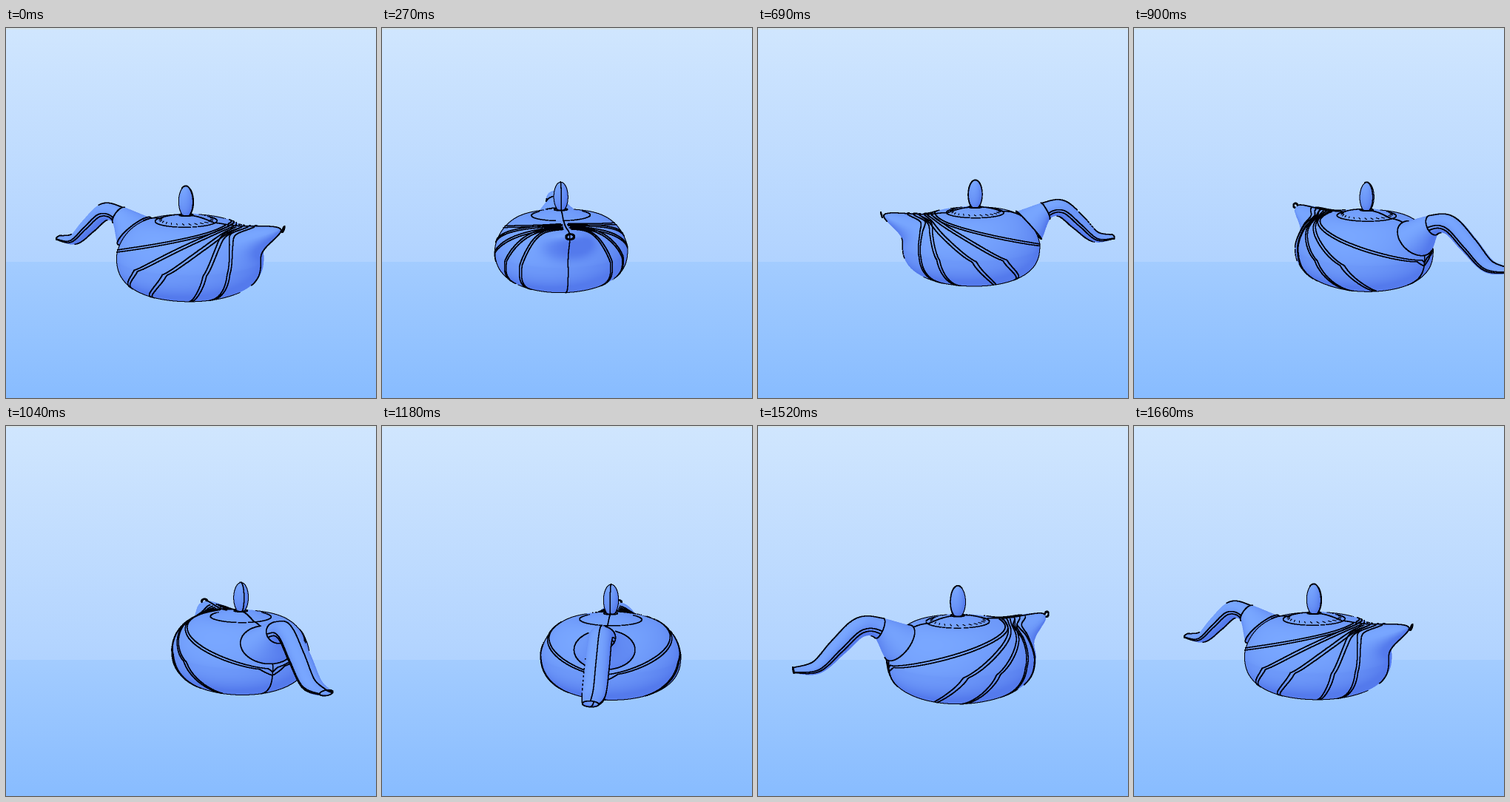
Recreate the animation shown at these times as an HTML page with a canvas. Size 500x500 px, loop 1730 ms.

```html
<!DOCTYPE html>
<html lang="en">
<head>
<meta charset="utf-8">
<title>Rotating teapot</title>
<style>
  html, body { margin: 0; width: 100%; height: 100%; overflow: hidden; }
  body {
    background:
      linear-gradient(#d6e3ea 2px, transparent 2px),
      linear-gradient(#d0e6fe 0, #b1d3ff 316px, #a3ccff 316px, #88bcff 500px);
  }
  canvas { display: block; width: 500px; height: 500px; }
</style>
</head>
<body>
<canvas id="stage" width="500" height="500"></canvas>
<script>
const LOOP = 1730, STEPS = 24, RAD = Math.PI / 180, TAU = 2 * Math.PI;
const TOP = 190, W = 1000, H = 400; // view strip, drawn at double size
const ctx = document.getElementById('stage').getContext('2d');

const { sin, cos, abs, min, max, hypot } = Math;
const pow = (x, p) => max(0, x) ** p;
const turn = (r, a, h) => [r * cos(a), r * sin(a), h];

// Body: superellipse of revolution, fuller at the front, with a spout drawn out of it.
// s runs from the lid rim (0) over the widest ring (6) to the base (12).
function bodyAt(a, s) {
  const q = s * 15 * RAD;
  let r, h;
  if (s < 6) {
    r = 40 + 52 * pow(sin(q), 0.91);
    h = -42 + 47 * pow(cos(q), 1.25);
  } else {
    r = 92 * pow(sin(q), 0.77);
    h = -42 - 50 * pow(-cos(q), 0.77);
  }
  r *= 1 + 0.12 * pow(cos(a), 2) * min(1, s / 3);
  const spout = Math.exp(-((a / 0.27) ** 2) - ((s - 3) / 1.15) ** 2);
  return turn(r + 40 * spout, a, h + 16 * spout);
}

const lidAt = (a, x) => turn(40.5 - 34.5 * x, a, 4.5 + 7.5 * sin(x * TAU / 4));
const knobAt = (a, x) => {
  const b = (30 + 150 * x) * RAD;
  return turn(10 * sin(b), a, 30 - 20.5 * cos(b));
};

// Handle sections: [u, height, half width, half thickness]
const HANDLE = [[-78, -16, 36, 26], [-102, 4, 15, 13], [-126, 7, 13, 12],
  [-152, -14, 13, 11], [-178, -36, 12, 8], [-205, -37, 8, 3]];
const TIP = HANDLE.length - 1;

// Catmull-Rom; t runs over the point index
function curve(pts, t) {
  const i = max(0, min(pts.length - 2, Math.floor(t))), f = t - i;
  const b = pts[i], c = pts[i + 1];
  const a = pts[i - 1] || b, d = pts[i + 2] || c;
  return b.map((p, k) => {
    const m = (c[k] - a[k]) / 2, n = (d[k] - p) / 2, e = c[k] - p;
    return p + f * (m + f * (3 * e - 2 * m - n + f * (m + n - 2 * e)));
  });
}

function handleAt(t, a) {
  const [u, h, wide, thick] = curve(HANDLE, t);
  const p = curve(HANDLE, max(0, t - 0.05)), q = curve(HANDLE, min(TIP, t + 0.05));
  const du = q[0] - p[0], dh = q[1] - p[1];
  const n = thick * sin(a) / hypot(du, dh);
  return [u + dh * n, wide * cos(a), h - du * n];
}

// Ribs fan out from the ridge behind the spout: angle and s both grow as powers of x
const RIBS = [
  { reach: 180, from: 1, to: 6.3, bend: 0.68 },
  { reach: 135, from: 1.25, to: 9.2, bend: 0.48 },
  { reach: 108, from: 1.6, to: 9.8, bend: 0.48 },
  { reach: 62, from: 1.8, to: 10, bend: 0.28 },
  { reach: 40, from: 2, to: 10, bend: 0.22 }
];
function ribAt({ reach, from, to, bend }, t, side, off) {
  const x = t ** 2.5;
  const a = min(180, 4 + (reach - 4) * x ** bend + 0.9 * off);
  return bodyAt(side * a * RAD, from + (to - from) * x - 0.1 * off);
}

// closed: the second parameter goes round; outlined: tells where a contour is inked
function grid(fn, n, m, closed, outlined) {
  const pts = [];
  for (let i = 0; i <= n; i++) for (let j = 0; j <= m; j++) pts.push(fn(i / n, j / m));
  return { pts, n, m, closed, outlined };
}

const meshes = [
  grid((x, y) => bodyAt((2 * x - 1) * Math.PI, y * 12), 120, 48, false,
    (x, y) => abs(2 * x - 1) > 0.28 || y > 0.7),
  grid((x, y) => lidAt(x * TAU, y), 60, 12, false, () => false),
  grid((x, y) => knobAt(x * TAU, y), 28, 22, false, () => true),
  grid((x, y) => handleAt(x * TIP, y * TAU), 54, 28, true, () => false)
];

const line = (fn, n = 120) => Array.from({ length: n + 1 }, (_, i) => fn(i / n));
const lines = [
  line(x => lidAt(x * TAU, 0)),
  line(x => turn(9, x * TAU, 12.2)),
  ...[0, 1, TIP].map(t => line(x => handleAt(t, x * TAU))),
  ...[90, -90].map(a => line(x => handleAt(1 + (TIP - 1) * x, a * RAD)))
];
for (const a of [0, Math.PI]) {
  lines.push(line(x => bodyAt(a, x * 11)), line(x => lidAt(a, x)), line(x => knobAt(a, x)));
}
for (const off of [-1, 1]) {
  for (const side of [-1, 1]) {
    for (const rib of RIBS) lines.push(line(x => ribAt(rib, x, side, off)));
    const edge = (-12 + 9 * off) * RAD;
    lines.push(line(x => handleAt(1 + (TIP - 1) * x, side > 0 ? edge : Math.PI - edge)));
  }
  const k = 1 + off * 0.15;
  lines.push(line(x => [131 + sin(x * TAU), 4.6 * k * cos(x * TAU), 4 + 3.4 * k * sin(x * TAU)]));
}
const flutes = Array.from({ length: 26 }, (_, i) =>
  [lidAt(i * TAU / 26, 0.15), lidAt(i * TAU / 26 + 0.07, 0.24)]);

// Camera space: x right, y up, z near, plus screen position and inverse depth
function camera(deg) {
  const axis = (22.7 + deg) * RAD, orbit = (145 + deg) * RAD;
  const c = cos(axis), s = sin(axis), kx = 40 * cos(orbit), kz = 40 * sin(orbit);
  return ([u, v, h]) => {
    const x = kx + u * c - v * s, d = kz + u * s + v * c;
    const y = 0.98 * h - 0.2 * d, z = 0.98 * d + 0.2 * h;
    const w = 1 / (1 - z / 750);
    return { x, y, z, w, sx: 2 * (277 + x * w), sy: 2 * (260 - TOP - y * w) };
  };
}

function shade(l, r, t, b) {
  const ax = r.x - l.x, ay = r.y - l.y, az = r.z - l.z;
  const bx = b.x - t.x, by = b.y - t.y, bz = b.z - t.z;
  const nx = ay * bz - az * by, ny = az * bx - ax * bz, nz = ax * by - ay * bx;
  const len = (hypot(nx, ny, nz) || 1) * (nz < 0 ? -1 : 1);
  return max(0, (-0.3 * nx + 0.58 * ny + 0.76 * nz) / len);
}

function render(deg) {
  const cv = document.createElement('canvas');
  cv.width = W;
  cv.height = H;
  const c2 = cv.getContext('2d'), img = c2.createImageData(W, H), px = img.data;
  const depth = new Float32Array(W * H), outlined = new Uint8Array(W * H);
  const view = camera(deg);

  function put(o, r, g, b) {
    o *= 4;
    px[o] = r; px[o + 1] = g; px[o + 2] = b; px[o + 3] = 255;
  }

  function dot(x, y, size) {
    if (x < 1 || y < 1 || x > W - 2 || y > H - 2) return;
    for (let dy = 2 - size; dy <= 1; dy++) {
      for (let dx = 2 - size; dx <= 1; dx++) put((y + dy) * W + x + dx, 0, 0, 8);
    }
  }

  function tri(a, b, c, ink) {
    const area = (b.sx - a.sx) * (c.sy - a.sy) - (b.sy - a.sy) * (c.sx - a.sx);
    if (abs(area) < 1e-6) return;
    const x0 = max(0, Math.ceil(min(a.sx, b.sx, c.sx)));
    const x1 = min(W - 1, Math.floor(max(a.sx, b.sx, c.sx)));
    const y0 = max(0, Math.ceil(min(a.sy, b.sy, c.sy)));
    const y1 = min(H - 1, Math.floor(max(a.sy, b.sy, c.sy)));
    for (let y = y0; y <= y1; y++) {
      for (let x = x0; x <= x1; x++) {
        const p = ((b.sx - x) * (c.sy - y) - (b.sy - y) * (c.sx - x)) / area;
        const q = ((c.sx - x) * (a.sy - y) - (c.sy - y) * (a.sx - x)) / area;
        const r = 1 - p - q;
        if (p < -1e-6 || q < -1e-6 || r < -1e-6) continue;
        const w = p * a.w + q * b.w + r * c.w, o = y * W + x;
        if (w <= depth[o]) continue;
        depth[o] = w;
        outlined[o] = ink;
        const k = p * a.k + q * b.k + r * c.k;
        put(o, 84 + 37 * k, 122 + 45 * k, 236 + 19 * k);
      }
    }
  }

  for (const { pts, n, m, closed, outlined: inked } of meshes) {
    const v = pts.map(view);
    const at = (i, j) => v[max(0, min(n, i)) * (m + 1) + max(0, min(m, j))];
    for (let i = 0; i <= n; i++) {
      for (let j = 0; j <= m; j++) {
        const l = !closed && i === 0 ? n - 1 : i - 1, r = !closed && i === n ? 1 : i + 1;
        const t = closed && j === 0 ? m - 1 : j - 1, b = closed && j === m ? 1 : j + 1;
        at(i, j).k = shade(at(l, j), at(r, j), at(i, t), at(i, b));
      }
    }
    for (let i = 0; i < n; i++) {
      for (let j = 0; j < m; j++) {
        const ink = inked(i / n, j / m);
        tri(at(i, j), at(i + 1, j), at(i, j + 1), ink);
        tri(at(i + 1, j), at(i + 1, j + 1), at(i, j + 1), ink);
      }
    }
  }

  // Contours: where the surface ends or drops away
  for (let o = W; o < W * (H - 1); o++) {
    if (!outlined[o]) continue;
    const drop = depth[o] - min(depth[o - 1], depth[o + 1], depth[o - W], depth[o + W]);
    if (drop > 0.03) dot(o % W, Math.floor(o / W), 2);
  }

  function stroke(pts, size) {
    const v = pts.map(view);
    for (let i = 1; i < v.length; i++) {
      const a = v[i - 1], b = v[i];
      const n = Math.ceil(hypot(b.sx - a.sx, b.sy - a.sy)) || 1;
      for (let k = 0; k <= n; k++) {
        const f = k / n;
        const x = Math.round(a.sx + (b.sx - a.sx) * f), y = Math.round(a.sy + (b.sy - a.sy) * f);
        if (a.w + (b.w - a.w) * f + 0.004 > depth[y * W + x]) dot(x, y, size);
      }
    }
  }

  for (const pts of lines) stroke(pts, 3);
  // The lid flutes only show from the sides
  if (abs(cos((22.7 + deg) * RAD)) > 0.4) for (const pts of flutes) stroke(pts, 2);
  c2.putImageData(img, 0, 0);
  return cv;
}

const views = [];
let shown = -1;

function frame() {
  const t = performance.now() % LOOP;
  const step = t < 60 || t >= 1660 ? 0 : Math.floor((t - 60) / 70) + 1;
  if (step !== shown) {
    shown = step;
    views[step] = views[step] || render(step * 360 / STEPS);
    ctx.clearRect(0, 0, 500, 500);
    ctx.drawImage(views[step], 0, TOP, W / 2, H / 2);
  }
  requestAnimationFrame(frame);
}
frame();
</script>
</body>
</html>
```
